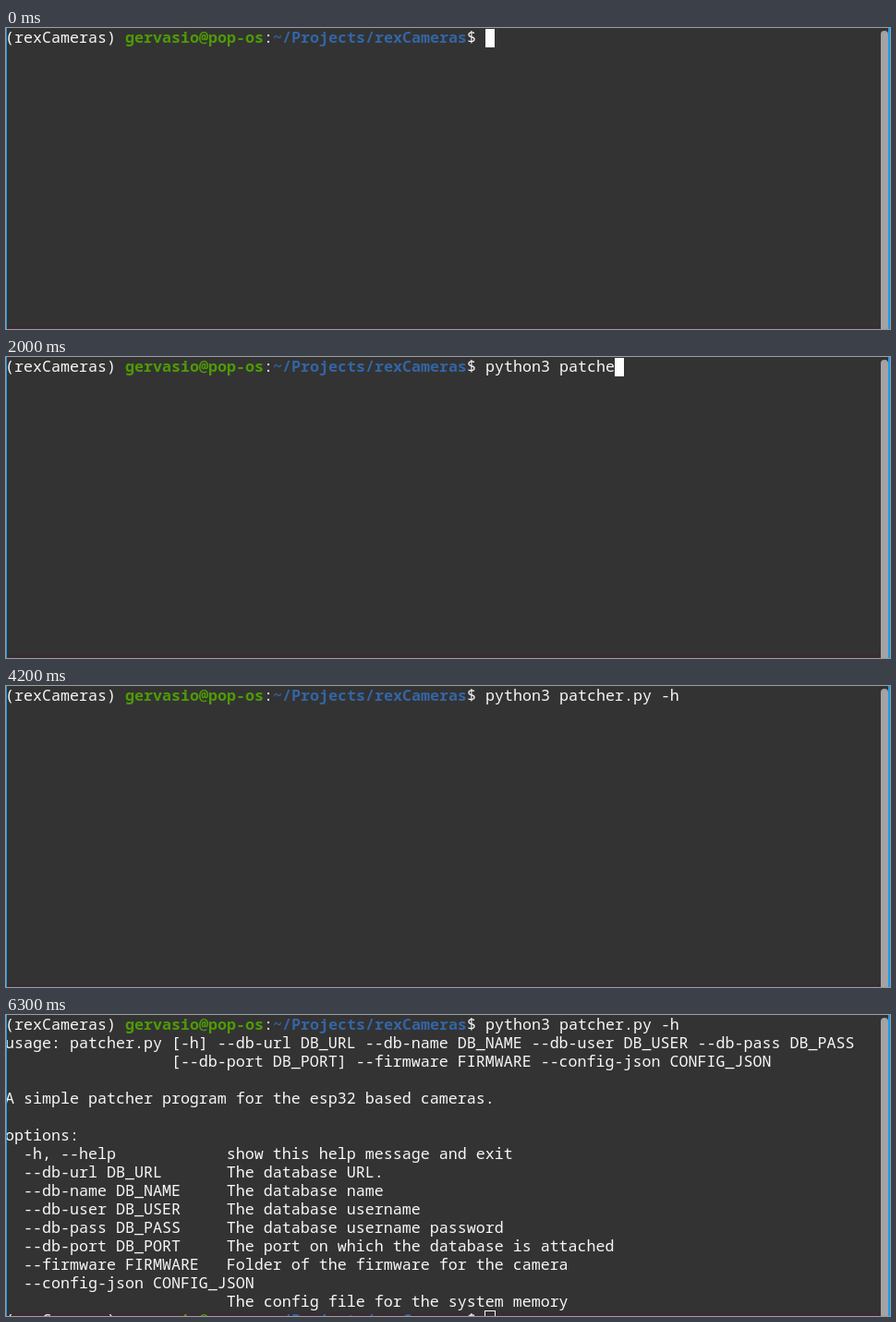
Animation, 957 px wide and 326 px high, one loop 6400 ms. Source, as an HTML page with a canvas:

```html
<!DOCTYPE html>
<html lang="en">
<head>
<meta charset="utf-8">
<title>Terminal help</title>
<style>
  html, body { margin: 0; width: 100%; height: 100%; overflow: hidden; background: #333; }
  canvas { display: block; width: 957px; height: 326px; }
</style>
</head>
<body>
<canvas id="stage" width="957" height="326"></canvas>
<script>
const ctx = document.getElementById('stage').getContext('2d');
const LOOP = 6400, CELL = 10, LINE = 20, LEFT = -1, TOP = 1;
const FONT = '16.6667px "Noto Sans Mono", "DejaVu Sans Mono", monospace';
const COLOR = { back: '#333333', text: '#f7f7f7', cursor: '#fdfdfd', user: '#4e9a06',
  path: '#3465a4', edge: '#1a9cec', bar: '#a3a3a3', shade: '#382d33' };

const COMMAND = 'python3 patcher.py -h';
const PROMPT = [
  ['(rexCameras) ', COLOR.text],
  ['gervasio@pop-os', COLOR.user, true],
  [':', COLOR.text],
  ['~/Projects/rexCameras', COLOR.path, true],
  ['$ ', COLOR.text]
];
const PROMPT_COLS = PROMPT.reduce((n, [s]) => n + s.length, 0);

// [time, characters on the command line]
const TYPING = [
  [0, 0], [200, 1], [300, 2], [500, 3], [600, 4], [700, 5], [800, 6], [900, 7],
  [1000, 8], [1100, 7], [1200, 8], [1300, 10], [1500, 11], [1800, 12], [1900, 13],
  [2000, 14], [2400, 15], [2600, 16], [2700, 17], [2900, 18], [3500, 19],
  [3600, 20], [3700, 21]
];
// [time, cursor look]
const CURSOR = [
  [0, 'block'], [3400, 'off'], [3500, 'block'], [4200, 'off'], [4300, 'block'],
  [4700, 'off'], [5300, 'block'], [6000, 'off'], [6300, 'outline']
];
const PRINT_AT = 4300;

const option = (flag, help) => ('  ' + flag).padEnd(24) + help;
const HELP = [
  'usage: patcher.py [-h] --db-url DB_URL --db-name DB_NAME --db-user DB_USER --db-pass DB_PASS',
  ' '.repeat(18) + '[--db-port DB_PORT] --firmware FIRMWARE --config-json CONFIG_JSON',
  '',
  'A simple patcher program for the esp32 based cameras.',
  '',
  'options:',
  option('-h, --help', 'show this help message and exit'),
  option('--db-url DB_URL', 'The database URL.'),
  option('--db-name DB_NAME', 'The database name'),
  option('--db-user DB_USER', 'The database username'),
  option('--db-pass DB_PASS', 'The database username password'),
  option('--db-port DB_PORT', 'The port on which the database is attached'),
  option('--firmware FIRMWARE', 'Folder of the firmware for the camera'),
  option('--config-json CONFIG_JSON', ''),
  option('', 'The config file for the system memory')
];

function valueAt(steps, t) {
  let value = steps[0][1];
  for (const [start, next] of steps) if (t >= start) value = next;
  return value;
}

function box(x, y, w, h, color) {
  ctx.fillStyle = color;
  ctx.fillRect(x, y, w, h);
}

function write(text, col, row, color = COLOR.text, bold = false) {
  ctx.font = (bold ? 'bold ' : '') + FONT;
  ctx.fillStyle = color;
  ctx.fillText(text, LEFT + col * CELL, TOP + row * LINE + 15);
}

function prompt(row) {
  let col = 0;
  for (const [text, color, bold] of PROMPT) {
    write(text, col, row, color, bold);
    col += text.length;
  }
}

function cursor(col, row, look) {
  const x = LEFT + col * CELL, y = TOP + row * LINE;
  if (look === 'block') box(x, y, CELL, LINE, COLOR.cursor);
  if (look === 'outline') {
    ctx.strokeStyle = COLOR.cursor;
    ctx.lineWidth = 1;
    ctx.strokeRect(x - 0.5, y - 0.5, CELL + 1, LINE + 1);
  }
}

function frame() {
  box(947, 0, 8, 326, COLOR.back);
  ctx.fillStyle = COLOR.bar;
  ctx.beginPath();
  ctx.roundRect(947, 3, 8, 340, 4);
  ctx.fill();
  box(0, 0, 1, 326, COLOR.edge);
  box(955, 0, 2, 326, COLOR.edge);
}

function draw(t) {
  const typed = valueAt(TYPING, t), look = valueAt(CURSOR, t);
  const printed = t >= PRINT_AT;
  box(0, 0, 957, 326, COLOR.back);
  box(0, 322, 957, 4, COLOR.shade);
  prompt(0);
  write(COMMAND.slice(0, typed), PROMPT_COLS, 0);
  if (printed) {
    HELP.forEach((line, i) => write(line, 0, i + 1));
    prompt(HELP.length + 1);
    cursor(PROMPT_COLS, HELP.length + 1, look);
  } else {
    cursor(PROMPT_COLS + typed, 0, look);
  }
  frame();
}

const begin = performance.now();
function tick() {
  draw((performance.now() - begin) % LOOP);
  requestAnimationFrame(tick);
}
tick();
</script>
</body>
</html>
```
